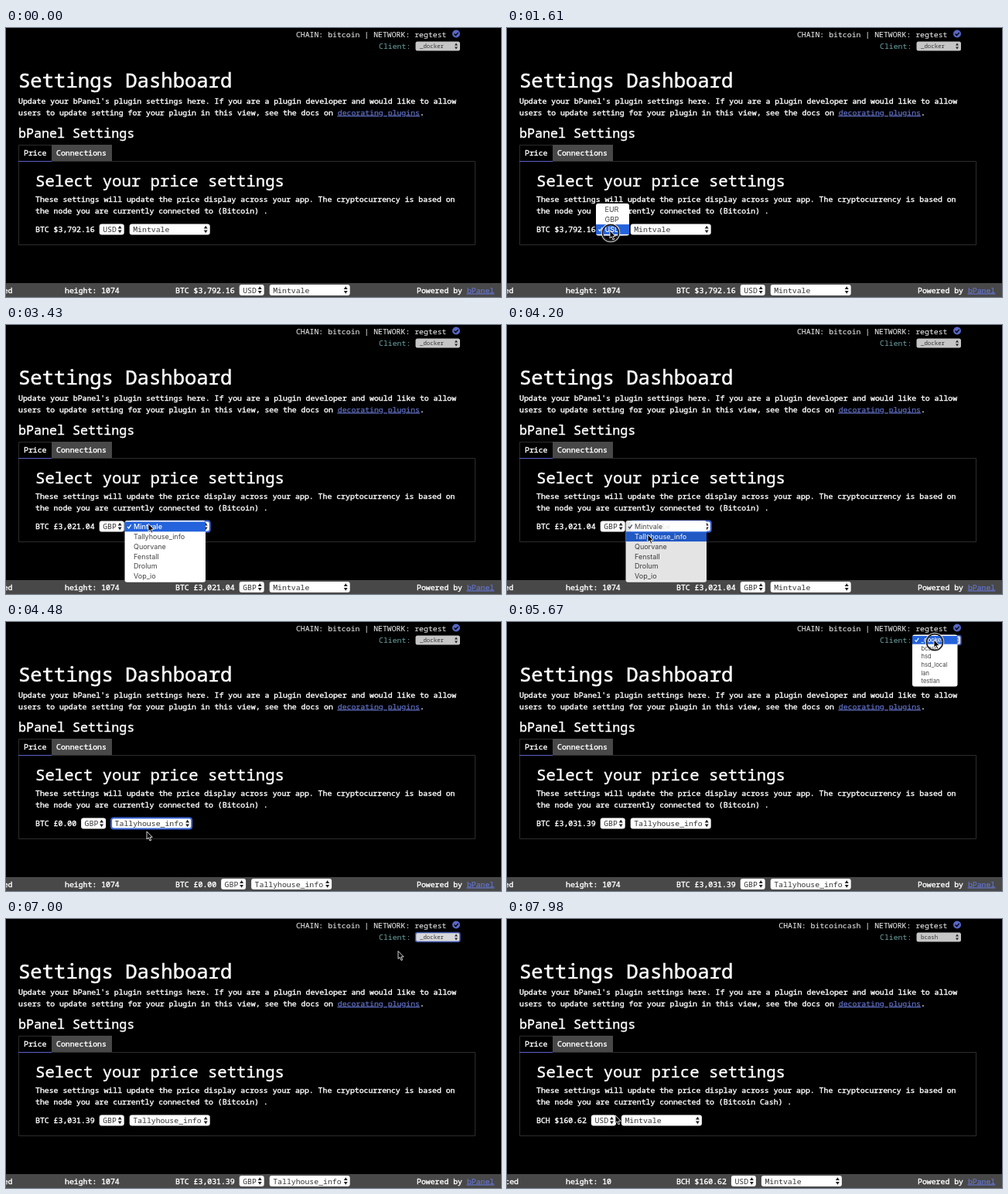
Write an HTML page that moves like this. It is 640 by 348 pixels and loops after 8000 ms.

```html
<!DOCTYPE html>
<html lang="en">
<head>
<meta charset="utf-8">
<title>Settings Dashboard</title>
<style>
html, body { margin: 0; width: 100%; height: 100%; overflow: hidden; background: #000; }
svg { display: block; width: 640px; height: 348px; background: #000; }
text { font: 9.83px "Noto Sans Mono", monospace; fill: #fff; stroke: #fff; stroke-width: .4px; white-space: pre; }
.light { fill: #e4e4e4; stroke-width: .1px; }
.h1 { font-size: 25.6px; stroke-width: .5px; }
.h2 { font-size: 16.7px; }
.h3 { font-size: 20.65px; }
.link { fill: #6474cc; stroke: #6474cc; stroke-width: .2px; text-decoration: underline; }
.teal { fill: #6fa8a8; stroke: none; }
.field { fill: #333; stroke: none; }
.small { font-size: 7.4px; }
.menu { font-family: Inter, "Liberation Sans", sans-serif; fill: #444; stroke: none; }
.menu.on { font-weight: 500; fill: #fff; }
</style>
</head>
<body>
<svg viewBox="0 0 640 348">
  <circle cx="582" cy="7.5" r="5" fill="#5866c4"/>
  <path d="M579.5 7.5l2 2 3.2-3.6" fill="none" stroke="#000" stroke-width="1.3"/>
  <text class="teal" x="482" y="26.5">Client:</text>
  <text class="h1" x="16" y="77">Settings Dashboard</text>
  <text x="16" y="98">Update your bPanel's plugin settings here. If you are a plugin developer and would like to allow</text>
  <text x="16" y="112.5">users to update setting for your plugin in this view, see the docs on <tspan class="link">decorating plugins</tspan>.</text>
  <text class="h2" x="16" y="142">bPanel Settings</text>
  <path d="M16.5 172V151.5H59M16.5 172V280.5H606.5V172.5H59" fill="none" stroke="#2c2c2c"/>
  <rect x="59" y="151" width="78" height="21" fill="#484848"/>
  <path d="M16 172.5H59" stroke="#5c60c8"/>
  <text x="23" y="165">Price</text>
  <text x="65" y="165">Connections</text>
  <text class="h3" x="38" y="205">Select your price settings</text>
  <text x="38" y="225">These settings will update the price display across your app. The cryptocurrency is based on</text>
  <rect y="330" width="640" height="18" fill="#484848"/>
  <text x="531" y="342.5">Powered by <tspan class="link">bPanel</tspan></text>
  <g id="live"></g>
</svg>
<script>
const LOOP = 8000, CHAR = 5.9;
const BLUE = '#2463dc';
const EXCHANGES = ['Mintvale', 'Tallyhouse_info', 'Quorvane', 'Fenstall', 'Drolum', 'Vop_io'];
const CLIENTS = ['_docker', 'bcash', 'hsd', 'hsd_local', 'lan', 'testlan'];
const live = document.getElementById('live');

// [start, amount, currency, exchange]
const prices = [
  [0, 'BTC $3,792.16', 'USD', 0],
  [2940, 'BTC £3,021.04', 'GBP', 0],
  [4400, 'BTC £0.00', 'GBP', 1],
  [4760, 'BTC £3,031.39', 'GBP', 1],
  [7140, 'BCH $0.00', 'USD', 0],
  [7490, 'BCH $160.62', 'USD', 0]
];

// open and close times, fade length, highlighted row as [time, index] steps
const menus = [
  { x: 115, y: 227, w: 43, row: 12.8, font: 9, items: ['EUR', 'GBP', 'USD'], checked: 2,
    open: 1500, close: 2690, fade: 190, hover: [[0, 2], [2240, 1]] },
  { x: 153.5, y: 253, w: 104.5, row: 12.8, font: 9, items: EXCHANGES, checked: 0,
    open: 3220, close: 4180, fade: 200, hover: [[0, 0], [3850, 1]] },
  { x: 524, y: 16.5, w: 58.5, row: 10.65, font: 7.6, items: CLIENTS, checked: 0,
    open: 5640, close: 6580, fade: 200, hover: [[0, 0], [6300, 1]] }
];

// [time, x, y] of the pointer tip
const path = [
  [420, 571, 5], [840, 121, 250], [1050, 121, 239], [1260, 132, 252],
  [1420, 132, 252], [1490, 133, 262], [2100, 133, 262], [2590, 156, 246],
  [2900, 156, 246], [3180, 184, 257], [3750, 184, 257], [3950, 182, 271],
  [4690, 182, 271], [4970, 190, 225], [5080, 190, 225], [5530, 552, 23],
  [6200, 552, 23], [6370, 549, 32], [6640, 549, 32], [6980, 507, 41.5],
  [7060, 507, 41.5], [7420, 300, 190], [7910, 140, 254]
];

// [start, end] of the click rings
const clicks = [[1470, 1820], [3200, 3400], [5630, 6090]];

const clamp = v => Math.max(0, Math.min(1, v));
const latest = (list, t) => list.filter(e => e[0] <= t).pop();
const text = (x, y, s, cls = '', extra = '') =>
  `<text class="${cls}" x="${x}" y="${y}" ${extra}>${s}</text>`;
const rect = (x, y, w, h, fill, rx = 0, extra = '') =>
  `<rect x="${x}" y="${y}" width="${w}" height="${h}" rx="${rx}" fill="${fill}" ${extra}/>`;

function field(x, y, w, label, focus) {
  const ring = focus ? 'stroke="#3c66d8" stroke-width="2"' : '';
  return rect(x, y, w, 14, '#fff', 3, ring) + text(x + 4.5, y + 10.5, label, 'field') +
    `<path d="M${x + w - 8} ${y + 6}l2.5-3.7 2.5 3.7zm0 2h5l-2.5 3.7z" fill="#222"/>`;
}

function priceRow(x, y, [, amount, currency, exchange], focus) {
  const at = x + amount.length * CHAR + 6;
  return text(x, y + 10.5, amount) + field(at, y, 32, currency, focus === 0) +
    field(at + 39, y, 104, EXCHANGES[exchange], focus === 1);
}

function clientField(label, focus) {
  return rect(529.5, 17.5, 57.5, 12, focus ? '#d8d8dc' : '#c6c6c6', 2.5,
      focus ? 'stroke="#3c52a8" stroke-width="1.5"' : '') +
    text(535, 26, label, 'field small') +
    '<path d="M580 22.5l2-3 2 3zm0 2h4l-2 3z" fill="#222"/>';
}

function menu(m, t) {
  if (t < m.open || t >= m.close + m.fade) return '';
  const on = latest(m.hover, t)[1];
  const rows = m.items.map((s, i) => {
    const y = m.y + 1.5 + i * m.row, mid = y + m.row / 2;
    const active = i === on;
    const tick = i === m.checked
      ? `<path d="M${m.x + 3.5} ${mid}l1.7 2 3-4.5" fill="none" stroke="${active ? '#fff' : '#444'}" stroke-width="1.2"/>`
      : '';
    return (active ? rect(m.x, y, m.w, m.row, BLUE) : '') + tick +
      text(m.x + 11.5, mid + m.font * 0.36, s, active ? 'menu on' : 'menu', `style="font-size:${m.font}px"`);
  });
  const alpha = 1 - clamp((t - m.close) / m.fade);
  return `<g opacity="${alpha}">` +
    rect(m.x, m.y, m.w, m.items.length * m.row + 3, '#fff', 3) + rows.join('') + '</g>';
}

function pointer(t) {
  if (t < path[0][0]) return '';
  const b = path.find(p => p[0] > t) || path[path.length - 1];
  const a = latest(path, t);
  const k = clamp((t - a[0]) / (b[0] - a[0] || 1));
  const e = k * k * (3 - 2 * k);
  const x = a[1] + (b[1] - a[1]) * e, y = a[2] + (b[2] - a[2]) * e;
  const click = clicks.find(c => t >= c[0] && t < c[1]);
  const ring = click
    ? `<g fill="none" opacity="${clamp((click[1] - t) / 120)}"><circle cx="1" cy="3" r="11" stroke="#ddd" stroke-width="2.5"/>` +
      '<circle cx="1" cy="3" r="10.5" stroke="#111" stroke-width="1.5"/></g>'
    : '';
  return `<g transform="translate(${x} ${y})">${ring}` +
    '<path d="M0 0V10L2.3 8 4 12 5.7 11.3 4 7.4H7.2Z" fill="#000" stroke="#eee" stroke-width=".9"/></g>';
}

function draw(t) {
  const price = latest(prices, t);
  const cash = t >= 7140;
  const focus = t >= 1500 && t < 3220 ? 0 : t >= 3220 && t < 4760 ? 1 : -1;
  live.innerHTML =
    text(569.5, 12, `CHAIN: ${cash ? 'bitcoincash' : 'bitcoin'} | NETWORK: regtest`, 'light', 'text-anchor="end"') +
    clientField(CLIENTS[+cash], t >= 5640 && !cash) +
    text(38, 240, `the node you are currently connected to (${cash ? 'Bitcoin Cash' : 'Bitcoin'}) .`) +
    priceRow(38, 253.5, price, focus) +
    text(cash ? 15 : 8.5, 342.5, 'Synced', '', 'text-anchor="end"') +
    text(76, 342.5, `height: ${cash ? 10 : 1074}`) +
    priceRow(219, 332, price) +
    menus.map(m => menu(m, t)).join('') + pointer(t);
}

const start = performance.now();
function tick(now) {
  draw(Math.max(0, now - start) % LOOP);
  requestAnimationFrame(tick);
}
draw(0);
requestAnimationFrame(tick);
</script>
</body>
</html>
```
